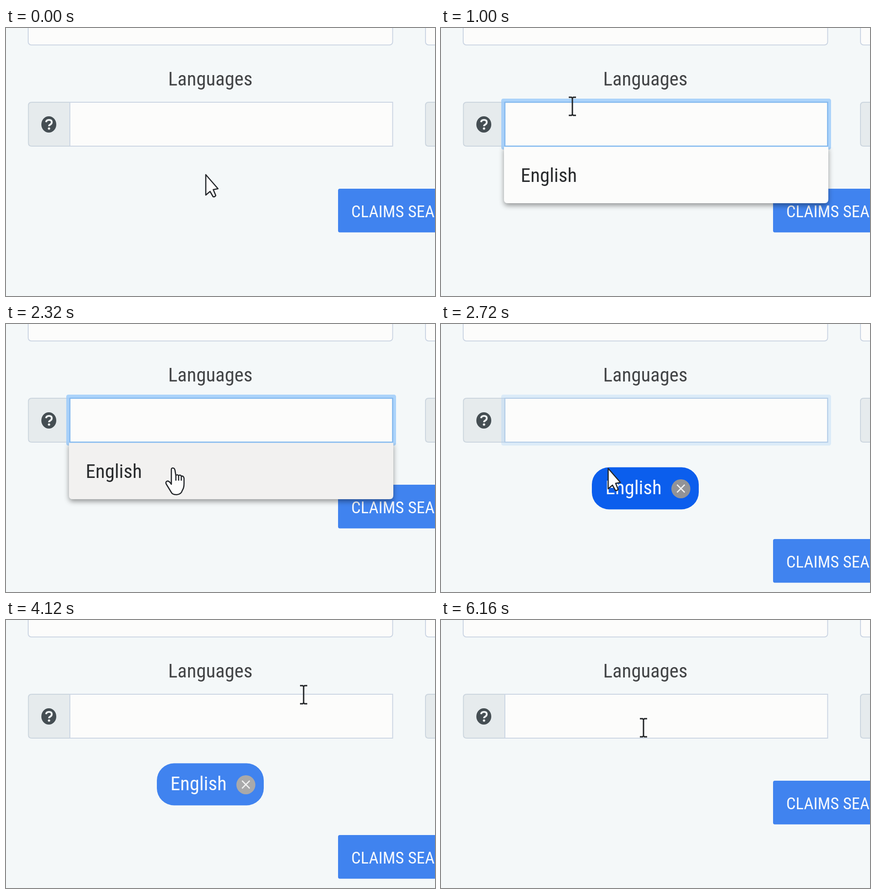
An HTML page for the animation above (6200 ms loop, 947 by 592 pixels).

```html
<!DOCTYPE html>
<html lang="en">
<head>
<meta charset="utf-8">
<title>Languages field</title>
<style>
  html, body { margin: 0; width: 100%; height: 100%; overflow: hidden; background: #f4f8f9; }
  svg { display: block; width: 947px; height: 592px; }
  text { font-family: "Roboto Condensed", Roboto, sans-serif; font-stretch: 75%; font-size: 43.2px; fill: #434547; }
  .box { fill: #fcfcfb; stroke: #cbd5e3; stroke-width: 2; }
  .addon { fill: #e6ebed; stroke: #cbd5de; stroke-width: 2; }
  .blue { fill: #4083ef; }
  .light { fill: #f6f9fd; }
  .outline { fill: #fdfdfd; stroke: #24272b; stroke-width: 2.6; stroke-linejoin: round; }
  #scene { filter: blur(.6px); }
</style>
</head>
<body>
<svg viewBox="0 0 947 592">
  <defs>
    <filter id="shadow" x="-10%" y="-20%" width="120%" height="150%">
      <feDropShadow dx="0" dy="5" stdDeviation="6" flood-color="#000" flood-opacity=".4"/>
    </filter>
    <clipPath id="below"><rect x="110" y="262.500" width="780" height="180"/></clipPath>
  </defs>
  <rect width="947" height="592" fill="#f4f8f9"/>
  <g id="scene">
    <rect class="box" x="49" y="-30" width="804.500" height="67.500" rx="7"/>
    <rect class="box" x="926" y="-30" width="100" height="67.500" rx="7"/>
    <g transform="translate(358 127.300)"><text>Languages</text></g>

    <path class="addon" d="M141 164H57Q49.500 164 49.500 171V254Q49.500 261 57 261H141Z"/>
    <path class="addon" d="M990 164H933Q926 164 926 171V254Q926 261 933 261H990Z"/>
    <ellipse cx="94.500" cy="213" rx="16.500" ry="18" fill="#454e53"/>
    <path d="M88.500 208Q89 203 95 203 101 203 101 208 101 211.500 97.500 213.500 95 215 95 217" fill="none" stroke="#eef2f3" stroke-width="4"/>
    <circle cx="95" cy="222" r="2.600" fill="#eef2f3"/>
    <rect class="box" x="141" y="164" width="712.500" height="97"/>

    <g id="button">
      <rect class="blue" x="733" y="355" width="300" height="96.500" rx="4"/>
      <g transform="translate(762 418)"><text class="light" style="font-size:37px">CLAIMS SEARCH</text></g>
    </g>

    <g id="focus">
      <rect x="136.500" y="159.500" width="721" height="105.500" rx="1" fill="none" stroke="#9ccbfb" stroke-width="7" opacity=".82"/>
      <rect x="141" y="164" width="712.500" height="97" fill="none" stroke="#82b8ee" stroke-width="2.500"/>
    </g>

    <g id="menu">
      <g clip-path="url(#below)">
        <path id="row" d="M139 262H855V378Q855 387 846 387H148Q139 387 139 378Z" filter="url(#shadow)"/>
      </g>
      <g transform="translate(176 339.600)"><text style="fill:#292b2d">English</text></g>
    </g>

    <g id="chip">
      <rect id="pill" x="333" y="316.500" width="236" height="93" rx="38"/>
      <g transform="translate(363 376)"><text class="light">English</text></g>
      <circle id="close" cx="529.500" cy="364" r="21"/>
      <path d="M521 355L538 372M538 355L521 372" stroke="#f1f1f1" stroke-width="2.600"/>
    </g>

    <g id="cursor">
      <path id="arrow" class="outline" d="M0 0V45L9.500 37 16 48.500Q20 50 22 46L16.500 33 27 31Z"/>
      <path id="beam" d="M-8-20H-2L0-18 2-20H8M-8 20H-2L0 18 2 20H8M0-18V18" fill="none" stroke="#202326" stroke-width="3"/>
      <g id="hand">
        <path class="outline" d="M-4 4Q-4 0-1 0 3 0 4 5L6 17Q9 13 12 17 15 14 18 18 23 17 24 23V35Q24 44 20 50 18 58 8 59-2 59-4 54L-15 36Q-18 31-13 29-9 28-4 36Z"/>
        <path class="outline" d="M6 17V28M12 17V28M18 18V28"/>
      </g>
    </g>
  </g>
</svg>
<script>
const LOOP = 6200, STEP = 40;
const OPEN = 760, PICK = 2640, REMOVE = 5680;

// time, x, y of the pointer
const path = [
  [0, 441, 324], [200, 436, 318], [640, 330, 212], [1000, 290, 173], [1400, 291, 174],
  [1720, 322, 236], [2040, 360, 300], [2320, 369, 318], [2760, 369, 319],
  [3160, 820, 222], [3320, 858, 203], [3520, 855, 198], [4120, 657, 165],
  [4480, 645, 167], [4840, 585, 258], [5200, 528, 352], [5560, 517, 362],
  [5720, 515, 360], [6000, 467, 272], [6160, 447, 238], [LOOP, 447, 238]
];

const el = id => document.getElementById(id);
const show = (id, on) => el(id).style.display = on ? "" : "none";
const ease = u => u * u * (3 - 2 * u);
const clamp = v => Math.max(0, Math.min(1, v));
const inside = ([x, y], l, t, r, b) => x >= l && x <= r && y >= t && y <= b;

function pointAt(t) {
  const i = path.findIndex((p, n) => n && p[0] >= t);
  const [t0, x0, y0] = path[i - 1], [t1, x1, y1] = path[i];
  const u = ease((t - t0) / (t1 - t0));
  return [x0 + (x1 - x0) * u, y0 + (y1 - y0) * u];
}

function draw(t) {
  const p = pointAt(t);
  const open = t >= OPEN && t < PICK;
  const picked = t >= PICK && t < REMOVE;
  const onField = inside(p, 141, 164, 853, 261);
  const onRow = open && inside(p, 139, 262, 855, 387);
  const onChip = picked && inside(p, 333, 317, 569, 409);

  show("menu", open);
  show("chip", picked);
  el("focus").style.opacity = clamp((t - OPEN) / 120) * clamp((PICK + 120 - t) / 120);
  el("row").setAttribute("fill", onRow ? "#f2f1f0" : "#fcfcfb");
  el("pill").setAttribute("fill", onChip ? "#0b5eed" : "#4083ef");
  el("close").setAttribute("fill", onChip ? "#929397" : "#a9a9aa");
  el("button").setAttribute("transform", `translate(0 ${picked ? 120 : 0})`);

  show("beam", onField);
  show("hand", onRow);
  show("arrow", !onField && !onRow);
  el("cursor").setAttribute("transform", `translate(${p[0].toFixed(1)} ${p[1].toFixed(1)})`);
}

// Condense the regular face when no condensed one is available.
const labels = [...document.querySelectorAll("text")];
if (labels[0].getComputedTextLength() > 197)
  labels.forEach(label => label.setAttribute("transform", "scale(.88 1)"));

const start = performance.now();
function tick() {
  const t = (performance.now() - start) % LOOP;
  draw(Math.floor(t / STEP) * STEP);
  requestAnimationFrame(tick);
}
tick();
</script>
</body>
</html>
```
